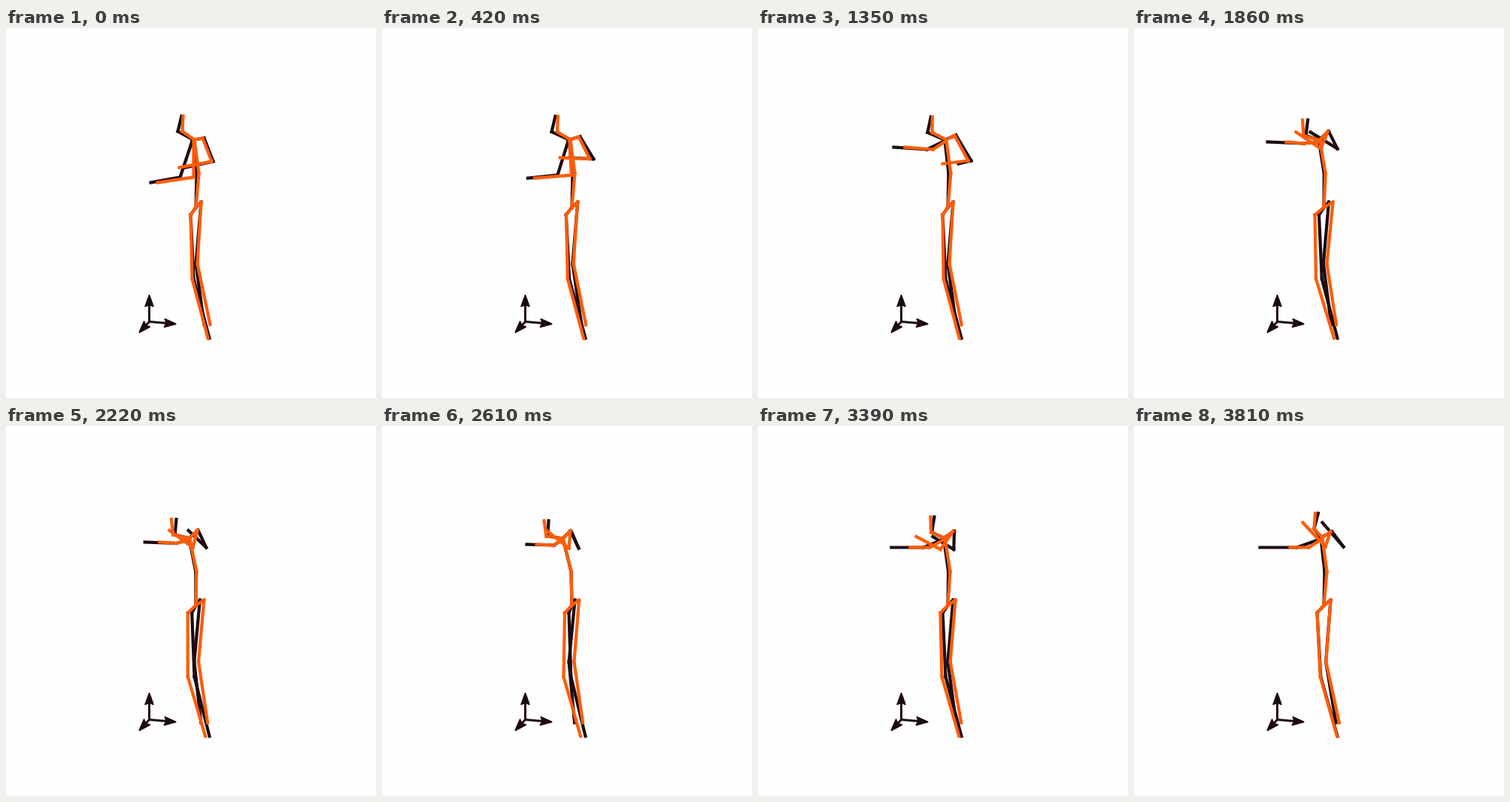
An HTML page with a canvas that plays this animation: 492x492 px, repeating every 3840 ms.

```html
<!DOCTYPE html>
<html lang="en">
<head>
<meta charset="utf-8">
<title>Two stick figures</title>
<style>
html, body { margin: 0; width: 100%; height: 100%; overflow: hidden; background: #fefefe; }
canvas { display: block; width: 492px; height: 492px; }
</style>
</head>
<body>
<canvas width="492" height="492"></canvas>
<script>
const ctx = document.querySelector('canvas').getContext('2d');
const LOOP = 3840, STEP = 30;
const keyTimes = [0, 870, 1350, 1860, 2610, 3000, 3810];

// Both figures share the heights of one motion; they differ in how it is turned sideways.
const shared = {
  lean: [0, 0.1, 0.15, 0.6, 1, 0.95, -0.1],
  shoulderR: [146, 142, 142, 137, 139, 139, 140],
  elbowR: [177, 170, 176, 160, 162, 167, 160],
  handR: [185, 158, 180, 138, 139, 164, 128],
  elbowL: [198, 192, 161, 153, 158, 161, 161],
  handL: [205, 193, 158, 151, 157, 161, 161]
};
const dark = {
  color: '#1d0c12',
  chest: 248, shoulder: 263, spine: 253, headTilt: 5,
  kneeL: 249, footL: 270, kneeR: 252, footR: 263,
  step: 0, kneeSwing: 1.3, footSwing: 2.5,
  tracks: {
    twist: [0, 1.5, 0, -0.5, -3, -2, 2],
    neck: [228, 222, 225, 228, 220, 223, 239],
    elbowR: [275, 287, 283, 270, 261, 243, 278],
    handR: [238, 261, 266, 234, 251, 215, 250],
    elbowL: [231, 235, 224, 225, 228, 223, 216],
    handL: [192, 195, 180, 177, 192, 186, 167]
  }
};
const orange = {
  color: '#ff5c0a',
  chest: 250, shoulder: 261, spine: 256, headTilt: 1,
  kneeL: 247, footL: 268, kneeR: 254, footR: 271,
  step: 0.28, kneeSwing: 0.4, footSwing: 0,
  tracks: {
    twist: [0, 1, 0, 5, 2.5, 4, 2],
    neck: [234, 231, 231, 225, 218, 221, 239],
    elbowR: [273, 279, 279, 248, 248, 231, 254],
    handR: [230, 243, 245, 215, 219, 197, 224],
    elbowL: [249, 254, 232, 224, 228, 224, 232],
    handL: [201, 204, 195, 202, 205, 197, 207]
  }
};

const mix = (a, b, t) => a + (b - a) * t;

function sample(tracks, time) {
  let i = keyTimes.length - 2;
  while (i > 0 && keyTimes[i] > time) i--;
  const t = (time - keyTimes[i]) / (keyTimes[i + 1] - keyTimes[i]);
  return Object.fromEntries(
    Object.entries(tracks).map(([name, keys]) => [name, mix(keys[i], keys[i + 1], t)]));
}

function polyline(...points) {
  for (let i = 1; i < points.length; i++) {
    ctx.beginPath();
    ctx.moveTo(...points[i - 1]);
    ctx.lineTo(...points[i]);
    ctx.stroke();
  }
}

function drawFigure(figure, time) {
  const x = sample(figure.tracks, time), y = sample(shared, time);
  const { lean } = y, { twist } = x;
  const bend = lean * lean;
  const step = (x.neck - 234) * figure.step;
  const joint = name => [x[name], y[name]];

  const neck = [x.neck, 137 + 9 * lean];
  const head = [x.neck + figure.headTilt - 4 * lean, neck[1] - 20.5];
  const chest = [mix(figure.chest, 240, bend), 148 + lean];
  const shoulderR = [mix(figure.shoulder, 250, bend), y.shoulderR];
  const shoulderL = [chest[0] - 1, chest[1] + 2];
  const spine = [mix(figure.spine, 251, bend), 193];
  const pelvis = [252, 238];

  ctx.strokeStyle = figure.color;
  ctx.lineWidth = 4.2;
  ctx.lineCap = 'square';
  polyline(head, neck, chest, spine, pelvis);
  polyline(chest, shoulderR, joint('elbowR'), joint('handR'));
  polyline(chest, shoulderL, joint('elbowL'), joint('handL'));
  polyline(pelvis, [245 - twist, 248],
    [figure.kneeL + step - 0.6 * twist, 333], [figure.footL + step, 412]);
  polyline(pelvis, [259 + twist, 231],
    [figure.kneeR + figure.kneeSwing * twist, 313],
    [figure.footR + step + figure.footSwing * twist, 394]);
}

function drawArrow(tipX, tipY) {
  const origin = [190, 390];
  const angle = Math.atan2(tipY - origin[1], tipX - origin[0]);
  const along = (back, side) => [
    tipX - back * Math.cos(angle) - side * Math.sin(angle),
    tipY - back * Math.sin(angle) + side * Math.cos(angle)
  ];
  ctx.strokeStyle = ctx.fillStyle = dark.color;
  ctx.lineCap = ctx.lineJoin = 'round';
  ctx.lineWidth = 3;
  polyline(origin, along(12, 0));
  ctx.lineWidth = 2;
  ctx.beginPath();
  for (const point of [[0, 0], [14.5, 5.2], [12, 0], [14.5, -5.2]]) ctx.lineTo(...along(...point));
  ctx.closePath();
  ctx.fill();
  ctx.stroke();
}

function draw() {
  const time = Math.floor(performance.now() % LOOP / STEP) * STEP;
  ctx.setTransform(1, 0, 0, 1, 0, 0);
  ctx.fillStyle = '#fefefe';
  ctx.fillRect(0, 0, 492, 492);
  ctx.translate(0.5, 0.5); // joints sit on pixel centres
  drawArrow(190, 355);
  drawArrow(225, 393);
  drawArrow(177, 404);
  drawFigure(dark, time);
  drawFigure(orange, time);
  requestAnimationFrame(draw);
}
draw();
</script>
</body>
</html>
```
